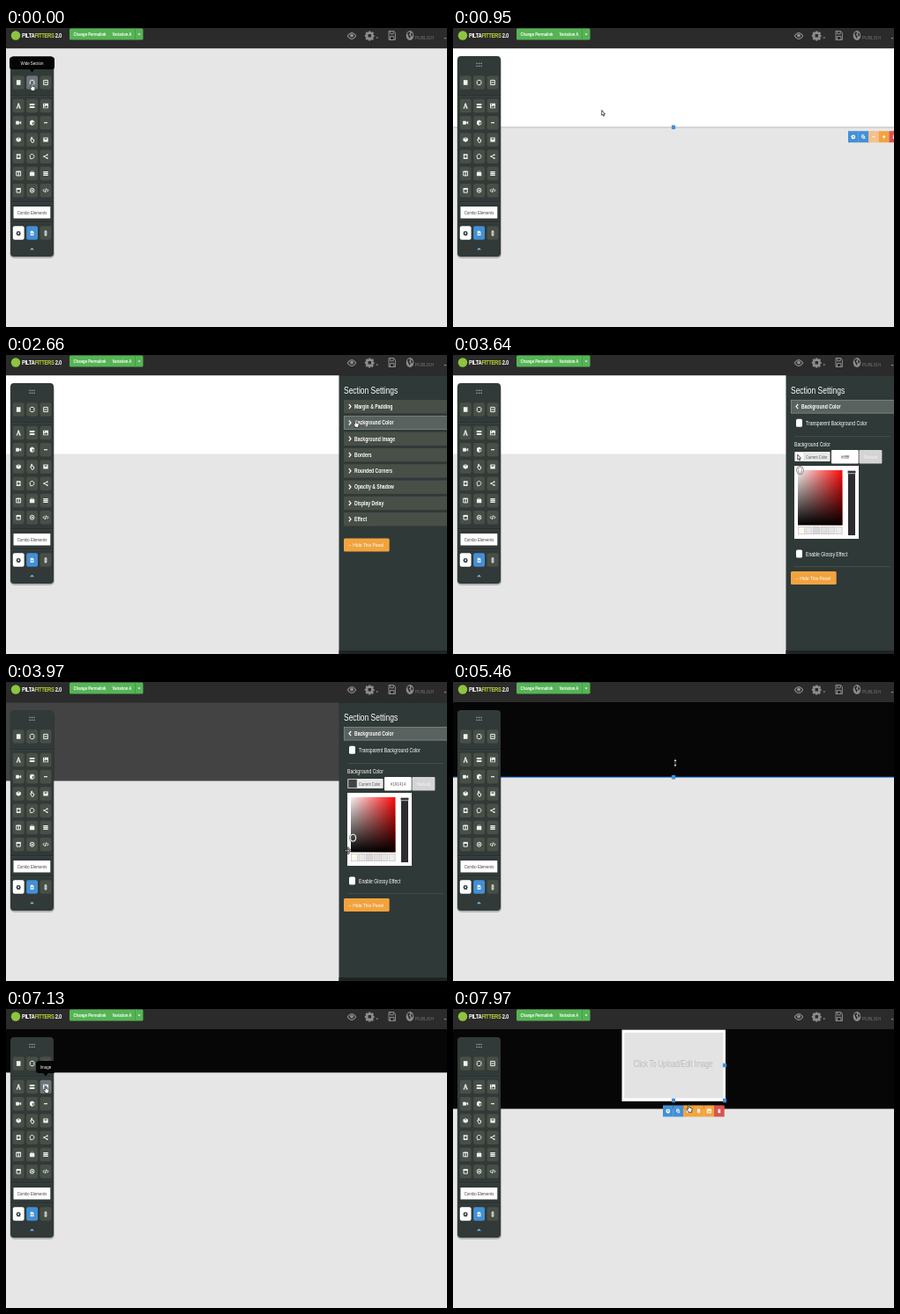
Write an HTML page that moves like this. It is 500 by 340 pixels and loops after 8000 ms.

```html
<!DOCTYPE html>
<html lang="en">
<head>
<meta charset="utf-8">
<title>Page builder</title>
<style>
  html, body { margin: 0; width: 100%; height: 100%; overflow: hidden; background: #e6e6e6; }
  svg { display: block; width: 500px; height: 340px; }
  text { font-family: "Liberation Sans", Arial, sans-serif; white-space: pre; }
</style>
</head>
<body>
<svg id="stage" viewBox="0 0 500 340" xmlns="http://www.w3.org/2000/svg"></svg>
<script>
const LOOP = 8000, BLUE = '#4390d6', ORANGE = '#f2a33f', RED = '#d9534f', NARROW = 0.8;

// ---- markup helpers
const rect = (x, y, w, h, fill, r = 0, more = '') =>
  `<rect x="${x}" y="${y}" width="${w}" height="${h}" rx="${r}" fill="${fill}" ${more}/>`;
// the screen is shown at 80 % of its width, so all lettering is too; y is the middle of the capitals
const label = (x, y, str, size, fill = '#fff', more = '') =>
  `<text transform="translate(${x} ${y + size * 0.36}) scale(${NARROW} 1)" font-size="${size}" fill="${fill}" ${more}>${str}</text>`;
const BOLD = 'font-weight="700"', MID = 'text-anchor="middle"';
const group = (id, body, more = '') => `<g id="${id}" ${more}>${body}</g>`;
const line = (d, color, w = 1) => `<path d="${d}" fill="none" stroke="${color}" stroke-width="${w}"/>`;
const icon = (x, y, name, color = '#f0f2f0', k = 1) => {
  const [fill, stroke] = ICONS[name];
  return `<g transform="translate(${x} ${y}) scale(${k})"><path d="${fill}" fill="${color}" fill-rule="evenodd"/>` +
    `<path d="${stroke}" fill="none" stroke="${color}" stroke-width="1"/></g>`;
};

// each icon: filled part, stroked part
const ICONS = {
  block: ['M-2.3-2.8h4.6v5.6h-4.6z', ''],
  wide: ['', 'M-1.4-2.6h2.8l.9 1v3.2l-.9 1h-2.8l-.9-1v-3.2z'],
  plusbox: ['M-1.6-.5h3.2v1h-3.2z', 'M-2.3-2.6h4.6v5.2h-4.6z'],
  letter: ['M-.6-3H.6L2.2 2.2h.5V3H.4v-.8h.4L.5 1h-1.3l-.3 1.2h.4V3h-2v-.8h.5zM-.6.2h.9l-.4-1.7z', ''],
  rows: ['M-2.8-2.6h5.6v2.1h-5.6zM-2.8.5h5.6v2.1h-5.6z', ''],
  image: ['M-3-2.8h6v5.6h-6zM-2.3 1.9h4.6v-1L.9-.6-.5 1l-.8-.7-1 .9zM-2-2v1.3h1.1v-1.3z', ''],
  video: ['M-3-2h3.7v4h-3.7zM1-.4L3-2v4L1 .4z', ''],
  cube: ['M0-3.2l2.6 1.4v3.6L0 3.2-2.6 1.8v-3.6zM.3-.1v2.3L1.9 1.3V-.9z', ''],
  minus: ['M-2-.6h4v1.2h-4z', ''],
  dice: ['M0-2.8l2.7 1.4v2.6L0 2.7-2.7 1.2v-2.6zM-1.2-1.2L0-.5l1.2-.7L0-1.8z', ''],
  hand: ['', 'M-1 1.6L-2.2.2l.6-.5.7.6v-3h1v2.2l2 .5-.2 2.3-.5.8h-1.8z'],
  mail: ['M-2.7-2.4h5.4v4.8h-5.4zM-2-1.6L0 .2l2-1.8z', ''],
  badge: ['M-2.4-2.9h4.8v5.8h-4.8zM-.6-1.6v1h-1v1.2h1v1h1.2v-1h1v-1.2h-1v-1z', ''],
  chat: ['', 'M-1.7 2.7v-1a2.4 2.5 0 1 1 1.4.6z'],
  share: ['M1-2.8h1.5v1.8H1zM1 1h1.5v1.8H1zM-2.6-.9h1.7V.9h-1.7z', 'M1.6-2l-3.4 2 3.4 2'],
  columns: ['M-2.6-2.6h5.2v1h-5.2z', 'M-2.4-2.4h4.8v4.8h-4.8zM0-2.4v4.8'],
  folder: ['M-2.7-1.6h1v-1.2h3.4v1.2h1v4.3h-5.4zM-1-1.6h2v-.6h-2z', ''],
  list: ['M-2.7-2.6h5.4v1.4h-5.4zM-2.7-.7h5.4v1.4h-5.4zM-2.7 1.2h5.4v1.4h-5.4z', ''],
  calendar: ['M-2.5-2.8h5v2h-5z', 'M-2.1-2.2h4.2v4.6h-4.2z'],
  target: ['M-.9-1h1.8v2h-1.8z', 'M-2.3 0a2.3 2.5 0 1 1 4.6 0a2.3 2.5 0 1 1-4.6 0z'],
  code: ['', 'M-1.6-1.6L-2.8 0l1.2 1.6M1.6-1.6L2.8 0 1.6 1.6M.6-2.3L-.6 2.3'],
  gear: ['M-.6-2.7H.6l.2.8 1-.4.7.8-.5.9.8.3v1l-.8.3.4 1-.8.8-.9-.5-.2.8H-.6l-.3-.8-.9.4-.7-.8.4-.9-.8-.4v-1l.8-.3-.4-.9.7-.8.9.4zM-.9-.9V.9H.9V-.9z', ''],
  copy: ['M-.9-.8h3v3.4h-3zM-.2 0v1.7h1.5V0z', 'M-1 1h-1.1v-3.4H.5v1.3'],
  plus: ['M-.6-2H.6v1.4H2V.6H.6V2H-.6V.6H-2V-.6h1.4z', ''],
  trash: ['M-1.9-1.8h1v-.8H.9v.8h1v.8h-3.8zM-1.6-.6h3.2v3.2h-3.2z', ''],
  file: ['M-1.9-2.7H.7l1.2 1.2v4.2h-3.8zM-1-.4v.7h2v-.7zM-1 1v.7h2V1z', ''],
  bar: ['', 'M-.8-2.6H.8v5.2H-.8z'],
  layer: ['M-2.3-2h4.6v1h-4.6zM-2.3-.5h4.6v2.8h-4.6z', '']
};

// ---- top bar
const topBar = () =>
  rect(0, 0, 500, 23, '#2b2b2b') + rect(0, 23, 500, 1, '#000', 0, 'opacity=".18"') +
  '<circle cx="11" cy="8.5" r="5.2" fill="#8cc63f"/>' +
  label(18, 8.6, 'PILTA<tspan fill="#b5d334">FITTERS</tspan> 2.0', 7.4, '#fff', BOLD + ' letter-spacing="-.45"') +
  rect(72, .5, 83.5, 13, '#56b455', 1.5) + rect(146, .5, .7, 13, '#3f9540') +
  label(76.5, 7, 'Change Permalink', 5.3, '#fff', BOLD) + label(120.5, 7, 'Variation A', 5.3, '#fff', BOLD) +
  '<path d="M149.5 6.4h3l-1.5 1.8z" fill="#fff"/>' +
  line('M387.3 9q4.7-7 9.4 0q-4.7 7-9.4 0z', '#8c8c8c', 1.1) + '<circle cx="392" cy="8.6" r="2" fill="#8c8c8c"/>' +
  icon(412.3, 8.7, 'gear', '#8c8c8c', 1.9) + '<path d="M419.3 10.5h3l-1.5 1.8zM496.5 11h3l-1.5 1.8z" fill="#8c8c8c"/>' +
  line('M434 3.5h5.6l1.8 2v8h-7.4zM435.8 3.5v3.3h3.4v-3.3M435.5 13.5v-4h4.4v4', '#8c8c8c', 1) +
  '<ellipse cx="458" cy="8.5" rx="4.3" ry="5.4" fill="#8c8c8c"/>' +
  '<path d="M455 6l2.2-2 1 1.5-1.3 2.2 1.8 1.5-1 2.8-1.4-2.4zM459.5 5l2 2.5-1.2 2.5-1.2-2.2z" fill="#2b2b2b"/>' +
  label(463.8, 11, 'PUBLISH', 6.2, '#747474');

// ---- tool box
const COLS = [14.2, 29.6, 45], ROWS = [62, 88.5, 107.7, 127, 146.2, 165.5, 184.7];
const TOOLS = ['block wide plusbox', 'letter rows image', 'video cube minus', 'dice hand mail',
  'badge chat share', 'columns folder list', 'calendar target code'].map(r => r.split(' '));
const cell = (x, y, fill, id = '') => rect(x - 6.4, y - 7.7, 12.8, 15.4, fill, 2, id && `id="${id}"`);
const toolBox = () => {
  let s = rect(4.5, 33, 50.5, 229, '#000', 5, 'opacity=".22"') + rect(5, 32, 49, 228, '#313a38', 4);
  for (let i = 0; i < 6; i++) s += rect(26.4 + i % 3 * 2.5, 39.7 + (i / 3 | 0) * 3, 1.3, 1.3, '#a9b0ad');
  for (const y of [76, 197.5, 220]) s += rect(5, y, 49, .8, '#1f2625') + rect(5, y + .8, 49, .6, '#434c4a');
  TOOLS.forEach((row, j) => row.forEach((name, i) => {
    s += cell(COLS[i], ROWS[j], '#474f47', 'tool-' + name) + icon(COLS[i], ROWS[j], name);
  }));
  s += rect(8.5, 203, 41.8, 13.6, '#fff', .5) + label(29.5, 209.8, 'Combo Elements', 5.5, '#444', MID);
  s += cell(COLS[0], 233, '#fff') + icon(COLS[0], 233.4, 'gear', '#333', .9);
  s += cell(COLS[1], 233, BLUE) + icon(COLS[1], 233.4, 'file');
  s += cell(COLS[2], 233, '#474f47') + icon(COLS[2], 233.4, 'bar');
  return s + '<path d="M27 252.3l2.5-2.6 2.5 2.6z" fill="#7fb5e4"/>';
};
const tip = (id, x, y, w, str) => group(id,
  rect(x - w / 2, y - 7, w, 14, '#050505', 3) + `<path d="M${x - 2.6} ${y + 7}h5.2l-2.6 3.4z" fill="#050505"/>` +
  label(x, y + .3, str, 5.5, '#fff', MID));

// ---- page section, image block and their button strips
const strip = (x, list) => list.map(([name, fill], i) =>
  rect(x + i * 11.6, 0, 11.7, 13, fill) + icon(x + i * 11.6 + 5.8, 6.5, name, '#fff', .85)).join('');
const knob = (x, y) => rect(x - 2.1, y - 2.3, 4.2, 4.6, BLUE);
const section = () =>
  rect(0, 23, 500, 90, '#fff', 0, 'id="area"') +
  rect(0, 0, 500, 1, '#b9bfc4', 0, 'id="edge"') +
  group('knob', knob(250, .3)) +
  group('strip', strip(448, [['gear', BLUE], ['copy', BLUE], ['minus', '#f6c08a'], ['plus', ORANGE], ['trash', RED]]) +
    group('gearHot', rect(448, 0, 11.7, 13, '#2a6ba6') + icon(453.8, 6.5, 'gear', '#fff', .85)));
const imageBlock = () => group('pic',
  rect(191.5, 23.5, 117.5, 81.5, '#fff') + rect(194.3, 26.8, 112, 74.6, '#e3e3e3') +
  label(249.5, 62, 'Click To Upload/Edit Image', 10, '#bdbdbd', MID + ' letter-spacing="-.28"')) +
  group('picTools', knob(250, 104) + knob(308, 64) + knob(308, 104) +
    group('', strip(238, [['gear', BLUE], ['copy', BLUE], ['layer', ORANGE], ['file', ORANGE], ['image', ORANGE], ['trash', RED]]),
      'transform="translate(0 109.5)"'));

// ---- settings panel
const ITEMS = ['Margin &amp; Padding', 'Background Color', 'Background Image', 'Borders', 'Rounded Corners',
  'Opacity &amp; Shadow', 'Display Delay', 'Effect'];
const STEP = 18.3, LIST = 51;
const check = (y, str) => rect(389, y - 4.5, 7, 9, '#fff', 1.5) + label(400, y + .3, str, 6.4);
const rule = y => rect(387, y, 109, .8, '#4a5351');
const picker = () => rect(387, 126, 73, 83, '#fff') +
  rect(391, 131, 50.5, 62.5, 'url(#hue)') + rect(391, 131, 50.5, 62.5, 'url(#dark)') +
  rect(448, 131, 8, 74, '#2d2d30') + rect(447.3, 131.5, 9.4, 3.2, '#333', .8, 'stroke="#ddd" stroke-width=".8"') +
  ['#fbf8ea', '#e6e6e6', '#d6d6d6', '#dedede', '#e4e4e4', '#ececec'].map((c, i) =>
    rect(391.4 + i * 8.55, 195.3, 7, 8.4, c, 0, 'stroke="#bbb" stroke-width=".6"')).join('') +
  group('ring', '<ellipse rx="3.2" ry="4" fill="none" stroke="#555" stroke-width="2"/><ellipse rx="3.2" ry="4" fill="none" stroke="#fff" stroke-width="1"/>');
const panel = () => rect(377.5, 23, 123, 317, '#2f3937') + rect(377.5, 336, 123, 4, '#1d2423') +
  label(383, 40.3, 'Section Settings', 10.6) +
  ITEMS.map((s, i) => group('item' + i,
    rect(383, 0, 118, 15.4, '#474f47') +
    (i === 1 ? rect(383.3, .3, 118, 14.8, '#59625f', 0, 'id="hot" stroke="#8b9391" stroke-width=".7"') : '') +
    group('chev' + i, line('M-1.2-2.6l2.2 2.6-2.2 2.6', '#fff', 1.2)) + label(395, 7.6, s, 6.4, '#fff', BOLD))).join('') +
  group('form', check(77.3, 'Transparent Background Color') + rule(92.3) +
    label(387, 101.8, 'Background Color', 6.4) +
    rect(387.4, 110, 40.2, 11, '#e9e9e9', 1) + rect(388, 110.6, 10, 9.8, '#fff', 0, 'id="swatch" stroke="#ccc" stroke-width=".6"') +
    label(400, 115.7, 'Current Color', 5.1, '#555') +
    rect(429, 108, 30.7, 15.6, '#fff', 1) + label(444.5, 116, '#ffffff', 5.6, '#555', MID + ' id="hex"') +
    rect(460.4, 108, 26, 15.6, '#d4d4d4', 1) + label(473.4, 116, 'Default', 6, '#f6f6f6', MID) +
    group('picker', picker()) +
    group('foot', check(142, 'Enable Glossy Effect') + rule(156.3))) +
  group('hide', rect(383, 0, 51.7, 15, ORANGE, 1.5) + label(387, 7.5, '→ Hide This Panel', 6.2));

// ---- pointers, drawn around their own middle
const pen = 'fill="#fff" stroke="#111" stroke-width=".7" stroke-linejoin="round"';
const pointers = {
  arrow: `<path d="M-1.8-3.4L1.9.8.3.9 1.2 2.9.2 3.3-.6 1.4-1.8 2.4z" ${pen}/>`,
  hand: `<path d="M-1.4 4.3v-1L-3.2.6l.7-.7 1.1 1v-4.6q.7-.9 1.4 0v2.8l2.8.8q.5.3.4 1L2.6 3.3v1z" ${pen}/>`,
  size: `<path d="M0-4.4L1.9-2H.6v4h1.3L0 4.4-1.9 2h1.3v-4h-1.3z" ${pen}/>`,
  move: `<path d="M0-4.2L1.5-2.4H.6v1.8h1.5v-1L3.4 0 2.1 1.6v-1H.6v1.8h.9L0 4.2-1.5 2.4h.9V.6h-1.5v1L-3.4 0l1.3-1.6v1h1.5v-1.8h-.9z" ${pen}/>`
};

document.getElementById('stage').innerHTML =
  '<defs><linearGradient id="hue"><stop stop-color="#f4f2f2"/><stop offset="1" stop-color="#ff0a0a"/></linearGradient>' +
  '<linearGradient id="dark" x2="0" y2="1"><stop stop-color="#000" stop-opacity="0"/><stop offset="1"/></linearGradient></defs>' +
  rect(0, 0, 500, 340, '#e6e6e6') + section() + imageBlock() + group('panel', panel()) + topBar() + toolBox() +
  tip('tipWide', 29.5, 40, 51, 'Wide Section') + tip('tipImage', 45, 66, 22, 'Image') +
  group('cursor', Object.entries(pointers).map(([id, s]) => group(id, s)).join(''));

// ---- motion tables: [time, value, ...]
const PATH = [[0, 30, 67.2], [60, 30, 67.2], [220, 30.3, 67.8], [640, 30.3, 67.8], [900, 150, 92], [1120, 300, 128],
  [1320, 372, 147], [1480, 372, 147], [1860, 452.5, 127.5], [2300, 452.5, 127.5], [2600, 397, 78], [2760, 397, 78],
  [3060, 398, 81], [3120, 398, 81], [3440, 392.5, 116.5], [3640, 392.5, 116.5], [3780, 393, 133], [3970, 388, 191.8],
  [4200, 389, 198], [4460, 389, 198], [4680, 408, 265], [4760, 408, 265], [5200, 252, 113], [5280, 252, 113],
  [5460, 252, 92], [5670, 252, 79], [5900, 252, 79], [6180, 251, 60], [6400, 237, 51], [6440, 232, 52],
  [6680, 75, 74], [6710, 75, 74], [6930, 46, 91], [7310, 45.5, 92], [7490, 45.5, 92], [7700, 140, 99], [7950, 268, 113], [8000, 268, 113]];
const BOTTOM = [[0, 112.5], [5320, 112.5], [5460, 108], [5670, 88], [5900, 88], [6180, 72.3], [7480, 72.3], [7481, 113.5], [8000, 113.5]];
const RING = [[0, 131], [3790, 131], [3970, 177], [4060, 193.5], [8000, 193.5]];
const SHAPES = [[0, 'hand'], [760, 'arrow'], [1780, 'hand'], [2360, 'arrow'], [2560, 'hand'], [3640, 'arrow'], [3760, 'move'],
  [4520, 'arrow'], [4620, 'hand'], [4800, 'arrow'], [5170, 'size'], [6200, 'arrow'], [6800, 'hand'], [7560, 'arrow'], [7900, 'hand']];

const smooth = p => p * p * (3 - 2 * p);
const ramp = (t, a, b) => smooth(Math.min(1, Math.max(0, (t - a) / (b - a))));
const mix = (keys, t, ease = p => p) => {
  let i = 1;
  while (i < keys.length - 1 && keys[i][0] <= t) i++;
  const [a, b] = [keys[i - 1], keys[i]];
  const p = ease(Math.min(1, Math.max(0, (t - a[0]) / (b[0] - a[0]))));
  return a.slice(1).map((v, k) => v + (b[k + 1] - v) * p);
};
const within = (t, ...spans) => spans.some(([a, b]) => t >= a && t < b);

const el = {};
document.querySelectorAll('[id]').forEach(n => el[n.id] = n);
const show = (id, on) => el[id].setAttribute('visibility', on ? 'inherit' : 'hidden');
const place = (id, x, y, more = '') => el[id].setAttribute('transform', `translate(${x} ${y}) ${more}`);
const paint = (id, fill) => el[id].setAttribute('fill', fill);
const hex = v => Math.round(Math.min(1, v) * 255).toString(16).padStart(2, '0');
const bright = y => 1 - (y - 131) / 62.5;

function drawSection(t, ringY) {
  const [bottom] = mix(BOTTOM, t);
  const v = bright(ringY), grey = Math.round(Math.max(6, v * 255));
  const drag = within(t, [5280, 6200]);
  const hover = within(t, [800, 2000], [5080, 6800]);
  const color = `rgb(${grey},${grey},${grey})`;
  show('area', t >= 640);
  el.area.setAttribute('height', bottom - 23);
  paint('area', color);
  paint('swatch', color);
  place('edge', 0, bottom);
  paint('edge', drag ? '#3f8fdf' : '#b9bfc4');
  show('edge', hover);
  place('knob', 0, bottom);
  show('knob', hover);
  place('strip', 0, bottom + 4.7);
  show('strip', hover && !drag);
  show('gearHot', within(t, [1800, 2000]));
  show('pic', t >= 7480);
  show('picTools', t >= 7790);
}

function drawPanel(t, ringY) {
  place('panel', 124 * (1 - ramp(t, 1990, 2270) + ramp(t, 4740, 5000)), 0);
  show('panel', within(t, [1990, 5000]));
  const k = ramp(t, 2720, 2980), open = t >= 3640;
  let y = LIST;
  ITEMS.forEach((_, i) => {
    const h = i === 1 ? 1 : 1 - k;
    place('item' + i, 0, y, `scale(1 ${h})`);
    el['item' + i].setAttribute('opacity', h);
    place('chev' + i, 390, 7.6, i === 1 && k > .5 ? 'scale(-1 1)' : '');
    y += STEP * h;
  });
  show('hot', t >= 2540);
  el.form.setAttribute('opacity', ramp(t, 2820, 3050));
  show('picker', open);
  place('foot', 0, open ? 84 : 0);
  place('hide', 0, y + 11 + 92.7 * k + (open ? 84 : 0) - 11 * k);
  place('ring', 393.5, ringY);
  const w = bright(mix(RING, t + 60)[0]), low = hex(w * (.89 + .11 * w));
  el.hex.textContent = '#' + hex(w * (1.16 - .16 * w)) + low + low;
}

function draw(t) {
  const [ringY] = mix(RING, t);
  drawSection(t, ringY);
  drawPanel(t, ringY);
  const wide = t < 760, img = within(t, [6880, 7560]);
  show('tipWide', wide);
  show('tipImage', img);
  paint('tool-wide', wide ? '#6c7578' : '#474f47');
  paint('tool-image', img ? '#6c7578' : '#474f47');
  place('cursor', ...mix(PATH, t, smooth));
  const shape = SHAPES.filter(s => s[0] <= t).pop()[1];
  for (const id in pointers) show(id, id === shape);
}

const start = performance.now();
(function tick() {
  draw((performance.now() - start) % LOOP);
  requestAnimationFrame(tick);
})();
</script>
</body>
</html>
```
